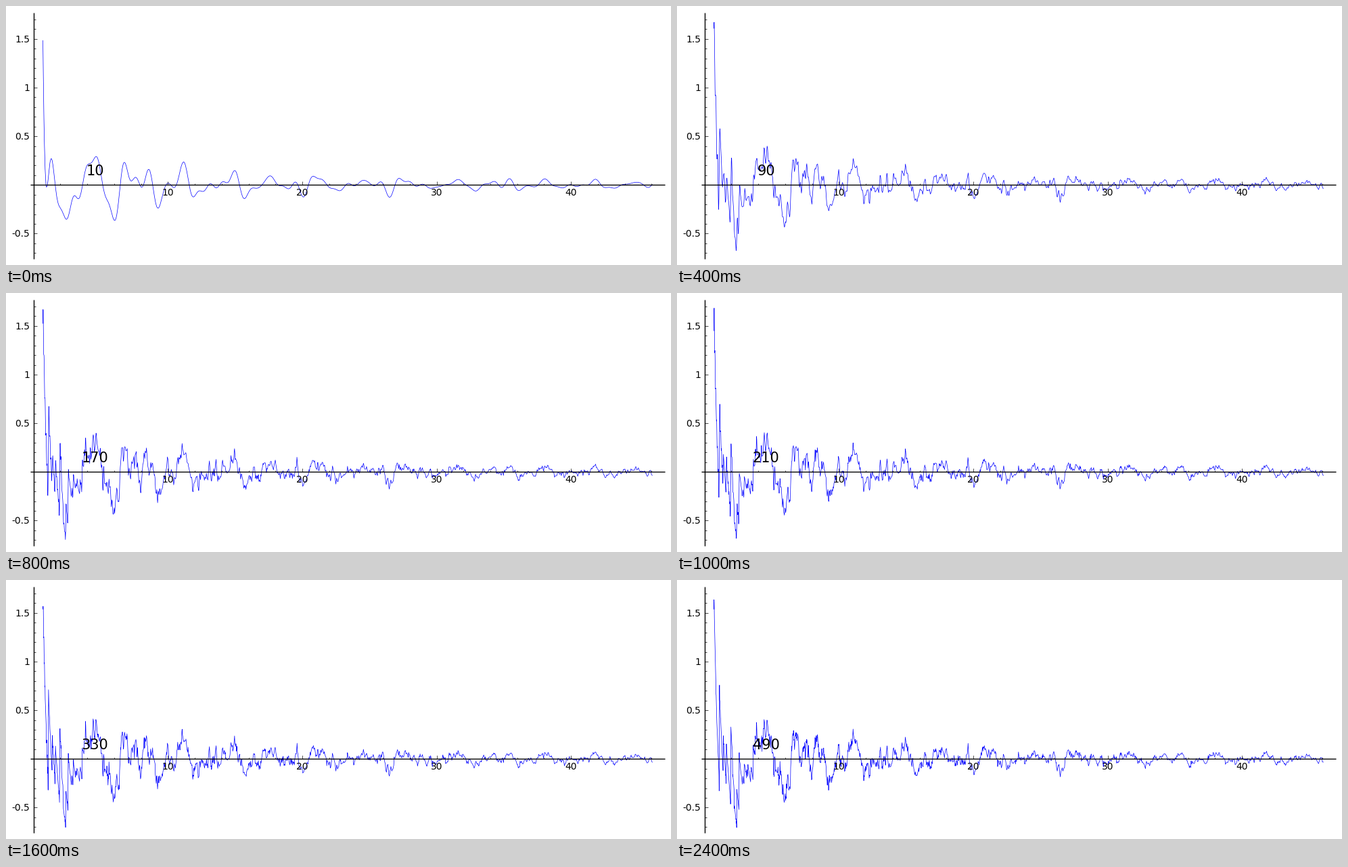
Recreate the animation shown at these times as a matplotlib script. Size 983x384 px, loop 2.6 s.

```python
import numpy as np
import matplotlib.pyplot as plt
from matplotlib.animation import FuncAnimation

# Oscillatory term (2 / x) * sum sin(g x) / g over the zeros 1 + ig of the
# L-function of the rank 3 elliptic curve y^2 + xy + y = x^3 - x^2 - 6x.
W, H, DPI = 983, 384, 100
CONDUCTOR, RANK = 11197, 3
TERMS = 10800
COUNTS = range(10, 491, 40)
X_MIN, X_MAX = np.log(2), 20 * np.log(10)
POINTS = 1000


def trace(p):
    """Coefficient a_p, from counting points mod p."""
    if p == 2:
        return -1
    x = np.arange(p, dtype=np.int64)
    chi = -np.ones(p, dtype=np.int64)
    chi[x * x % p] = 1
    chi[0] = 0
    return -int(chi[(((4 * x - 3) * x - 22) * x + 1) % p].sum())


def coefficients(size):
    c = [0] * (size + 1)
    c[1] = 1
    composite = bytearray(size + 1)
    for p in range(2, size + 1):
        if composite[p]:
            continue
        ap = trace(p)
        for n in range(p, size + 1, p):
            composite[n] = 1
            c[n] += ap * c[n // p]
            if n % (p * p) == 0:
                c[n] -= p * c[n // (p * p)]
    return np.array(c[1:], dtype=float)


def find_zeros(amount, tilt=0.05, step=0.006, size=2 ** 17):
    """Sign changes of the completed L-function, as a tilted Mellin transform."""
    c = coefficients(TERMS)
    n = np.arange(1, TERMS + 1)
    z = np.exp(np.arange(0, np.log(TERMS), step) + 1j * (np.pi / 2 - tilt))
    form = np.empty(len(z), dtype=complex)
    for i, zi in enumerate(z):
        k = int(TERMS / abs(zi)) + 1
        form[i] = zi * (c[:k] @ np.exp(-2 * np.pi * zi / np.sqrt(CONDUCTOR) * n[:k]))
    form[0] /= 2
    t = 2 * np.pi * np.arange(size) / (step * size)
    value = np.fft.ifft(form, size).imag
    inside = (t > 0.5) & (t < 235)
    t, value = t[inside], value[inside]
    i = np.flatnonzero(value[:-1] * value[1:] < 0)
    roots = t[i] + (t[i + 1] - t[i]) * value[i] / (value[i] - value[i + 1])
    return roots[:amount]


ZEROS = find_zeros(COUNTS[-1] - RANK)


def wave(x, count):
    g = ZEROS[:count - RANK]
    return 2 * (np.sin(np.outer(x, g)) @ (1 / g)) / x


def sample(count):
    """Jittered points, with midpoints added where the curve bends."""
    rng = np.random.default_rng(count)
    x = np.linspace(X_MIN, X_MAX, POINTS)
    x[1:-1] += (X_MAX - X_MIN) / POINTS * (rng.random(POINTS - 2) - 0.5)
    y = wave(x, count)
    tolerance = 0.01 * (y.max() - y.min())
    xs, ys = [x], [y]
    a, b, fa, fb = x[:-1], x[1:], y[:-1], y[1:]
    for _ in range(5):
        m = (a + b) / 2
        fm = wave(m, count)
        bent = np.abs((fa + fb) / 2 - fm) > tolerance
        a, b, m, fa, fb, fm = (v[bent] for v in (a, b, m, fa, fb, fm))
        xs.append(m)
        ys.append(fm)
        a, b = np.concatenate([a, m]), np.concatenate([m, b])
        fa, fb = np.concatenate([fa, fm]), np.concatenate([fm, fb])
    x, y = np.concatenate(xs), np.concatenate(ys)
    order = np.argsort(x)
    return x[order], y[order]


def px(x):
    return 40.75 + 19.86 * x


def py(y):
    return 265.3 - 144.3 * y


plt.rcParams["font.family"] = "DejaVu Sans"
fig = plt.figure(figsize=(W / DPI, H / DPI), dpi=DPI, facecolor="white")
ax = fig.add_axes([0, 0, 1, 1])
ax.set_xlim(0, W)
ax.set_ylim(H, 0)
ax.axis("off")


def segment(xs, ys, width):
    ax.plot(xs, ys, color="black", lw=width, snap=True, zorder=2.5,
            solid_capstyle="butt")


segment([36, 973.5], [py(0)] * 2, 1)
segment([px(0)] * 2, [10, 375], 1)
for v in range(2, 47, 2):
    major = v % 10 == 0
    segment([px(v)] * 2, [py(0), py(0) - (5.6 if major else 2.8)], 0.5)
    if major:
        ax.text(px(v), 280.8, str(v), size=10, ha="center", va="baseline", zorder=3)
for v in range(-7, 18):
    major = v % 5 == 0
    segment([px(0), px(0) + (5.6 if major else 2.8)], [py(v / 10)] * 2, 0.5)
    if major and v:
        ax.text(35.4, py(v / 10) + 4.7, f"{v / 10:g}", size=10, ha="right",
                va="baseline", zorder=3)

curve, = ax.plot([], [], color="blue", lw=0.5, zorder=2)
counter = ax.text(131.6, 251.3, "", size=15, ha="center", va="baseline", zorder=3)


def update(i):
    x, y = sample(COUNTS[i])
    curve.set_data(px(x), py(y))
    counter.set_text(str(COUNTS[i]))
    return curve, counter


anim = FuncAnimation(fig, update, frames=len(COUNTS), interval=200,
                     repeat=True, repeat_delay=0)
plt.show()
```
